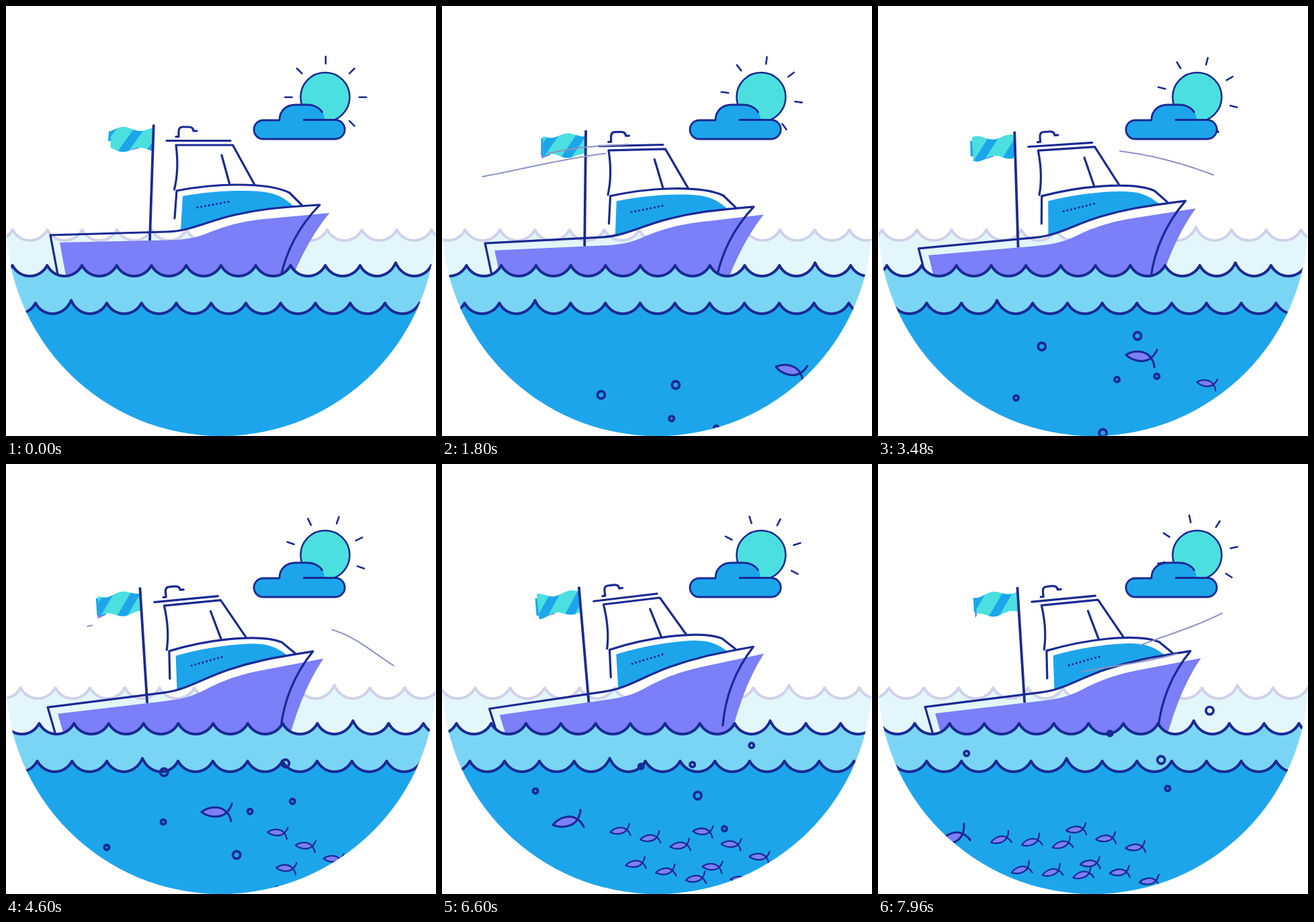
An HTML page with a canvas for the animation above (8000 ms loop, 640x640 px).

```html
<!DOCTYPE html>
<html lang="en">
<head>
<meta charset="utf-8">
<title>Boat at sea</title>
<style>
html, body { margin: 0; width: 100%; height: 100%; overflow: hidden; background: #fff; }
canvas { display: block; width: 100vw; height: 100vh; }
</style>
</head>
<body>
<canvas id="stage" width="640" height="640"></canvas>
<script>
const ctx = document.getElementById('stage').getContext('2d');
const NAVY = '#1a2a93', BLUE = '#1da5ec', PALE = '#e3f6fc', SKY = '#7ad5f4';
const TEAL = '#4be0df', PURPLE = '#7b7ff8', LILAC = '#d0d1ea', WIND = '#8c92c2';
const LOOP = 8000, STEP = 112, TAU = Math.PI * 2, RAD = Math.PI / 180;

// Value at x along rows [x, a, b, ...]: a smooth curve, or straight pieces.
function along(rows, x, smooth = true) {
  const last = rows.length - 1;
  let i = 0;
  while (i < last - 1 && x > rows[i + 1][0]) i++;
  const p = rows[i], q = rows[i + 1], h = q[0] - p[0];
  const u = Math.min(Math.max((x - p[0]) / h, 0), 1), w = u * u * (3 - 2 * u);
  const slope = (j, c) => {
    const a = rows[Math.max(j - 1, 0)], b = rows[Math.min(j + 1, last)];
    return (b[c] - a[c]) / (b[0] - a[0]);
  };
  return p.slice(1).map((v, k) => {
    const c = k + 1, gap = q[c] - v;
    if (!smooth) return v + gap * u;
    return v + gap * w + h * u * (1 - u) * (slope(i, c) * (1 - u) - slope(i + 1, c) * u);
  });
}

function fill(path, color) {
  ctx.fillStyle = color;
  ctx.fill(path);
}

function line(path, width, color = NAVY) {
  ctx.strokeStyle = color;
  ctx.lineWidth = width;
  ctx.stroke(path);
}

function poly(points) {
  const p = new Path2D();
  points.forEach(([x, y]) => p.lineTo(x, y));
  p.closePath();
  return p;
}

const globe = new Path2D();
globe.arc(320, 320, 320, 0, TAU);

function inGlobe(draw) {
  ctx.save();
  ctx.clip(globe);
  draw();
  ctx.restore();
}

// Row of scallops; the crest at the seam stands a little taller.
function wave(seam, top, color, edge) {
  const p = new Path2D();
  let px = 0, py = 0;
  for (let k = -14; k <= 14; k++) {
    const x = seam + Math.sign(k) * (k ? 53 + 51.75 * (Math.abs(k) - 1) : 0);
    const y = k ? top : top - 4;
    const low = (8 * (top + 16) - py - y) / 6;
    if (k === -14) p.moveTo(x, y);
    else p.bezierCurveTo(px + 11, low, x - 11, low, x, y);
    px = x;
    py = y;
  }
  const body = new Path2D(p);
  body.lineTo(px, 660);
  body.lineTo(-900, 660);
  fill(body, color);
  line(p, 4, edge);
}

const CLOUD = new Path2D('M443 169.5H490A14.2 14.2 0 0 1 490 198H383A14 14 0 0 1 383 170H407C407 155 418 147 431 147H448C459 147 467 152 470.5 158');
const CLOUD_FILL = new Path2D('M490 169.5A14.2 14.2 0 0 1 490 198H383A14 14 0 0 1 383 170H407C407 155 418 147 431 147H448C463 147 474 157 474.5 169.5Z');

function sky(t) {
  const rays = new Path2D();
  for (let i = 0; i < 8; i++) {
    const a = (t * 4.15 + i * 45) * RAD, c = Math.cos(a), s = Math.sin(a);
    rays.moveTo(475.8 + 50 * c, 135.8 + 50 * s);
    rays.lineTo(475.8 + 60.5 * c, 135.8 + 60.5 * s);
  }
  line(rays, 2.6);
  const sun = new Path2D();
  sun.arc(475, 135.5, 36.5, 0, TAU);
  fill(sun, TEAL);
  line(sun, 2.6);
  fill(CLOUD_FILL, BLUE);
  line(CLOUD, 2.8);
}

const HULL = new Path2D('M80 352L240 348.5C265 348 280 346 300 338C320 330 345 321 385 317L481.5 308Q439 359 409 450L98 450Z');
const HULL_LINE = new Path2D('M78 405L66 341L240 336C275 335 300 320 340 311C375 303 400 300 467 296Q421 343 408 407');
const GLASS = new Path2D('M263 283C300 276 340 274 370 275.5C395 277 410 281 428 298C390 301 365 304 340 311C305 319 285 330 260 333.5Z');
const CABIN = new Path2D('M251 316L254 275C285 269 320 266 345 266C385 266 410 272 422 278L440 296M250.5 273C255 255 256 230 253 207H337.5L370 266M321 222L333 266M239 200.5H334M253 194.5H257V187C257 182 259 180 263 180H271C276 180 279 182 279 186H284');
const DOTS = new Path2D('M285 299.8L331.5 291.3');
const MAST = new Path2D('M219.8 176.5L214 349');

function flag(t) {
  const phase = t / 2.8 % 1, right = 218, width = 62;
  const crest = (43 + 50 * phase) % 50;
  const ripple = u => (2.5 + u / 50) * Math.cos((u - crest) / 50 * TAU);

  // Underside showing where the lower edge lifts.
  for (const c of [crest, crest + 50]) {
    const a = right - Math.max(c - 23, 18), b = right - Math.min(c, 65);
    if (b < a) fill(poly([[a, 205], [b, 203], [b, 217], [a, 212]]), PURPLE);
  }
  const low = 202 + 12 * Math.sin(Math.PI * phase);
  fill(poly([[right - 54, 188], [right - 65, 186], [right - 66, low - 1], [right - 54, low]]), BLUE);

  const upper = [], lower = [];
  for (let u = 0; u <= width; u += 2) {
    upper.push([right - u, 183.2 - ripple(u)]);
    lower.unshift([right - u - 0.5, 213.8 + ripple(u)]);
  }
  const cloth = poly([...upper, ...lower]);
  fill(cloth, TEAL);
  ctx.save();
  ctx.clip(cloth);
  for (let k = -2; k < 2; k++) {
    const x = right - 17 - 42 * (phase + k);
    fill(poly([[x - 8, 179], [x + 8, 179], [x - 20, 218], [x - 36, 218]]), BLUE);
  }
  ctx.restore();
}

// Key poses: seconds, centre x, centre y, tilt in degrees.
const SWAY = [[0, 266.5, 318.5, 0], [1.79, 264, 326, -1.3], [3.47, 259, 325.5, -3.7],
  [4.59, 259.5, 320.5, -5.5], [5.71, 265.5, 317, -6.75], [7.39, 267.5, 319.7, -6.5], [7.95, 267.5, 320, -5.5]];

function boat(t) {
  const [x, y, tilt] = along(SWAY, t);
  ctx.save();
  ctx.translate(x, y);
  ctx.rotate(tilt * RAD);
  ctx.translate(-266.5, -318.5);
  fill(HULL, PURPLE);
  fill(GLASS, BLUE);
  line(HULL_LINE, 3.2);
  line(CABIN, 3.2);
  ctx.setLineDash([0, 5.85]);
  line(DOTS, 3.2);
  ctx.setLineDash([]);
  flag(t);
  ctx.lineCap = 'butt';
  line(MAST, 3.8);
  ctx.restore();
}

// Each gust: a curve, and the part of it in sight as [seconds, from x, to x].
const ARC = [[60, 254], [243, 219.5], [360, 216], [499, 251.5], [577, 300]];
const GUSTS = [
  [ARC, [[1.1, 60, 60], [1.79, 60, 243], [3.47, 360, 499], [4.59, 485, 577], [5.4, 577, 577]]],
  [ARC, [[4.2, 180, 200], [4.8, 90, 90]]],
  [[[158, 219], [215, 210], [340, 203]], [[1.35, 158, 158], [1.79, 158, 276], [2.6, 340, 340]]],
  [[[305, 309], [445, 282.5], [503, 255], [551, 218]], [[7.1, 551, 551], [7.39, 448, 551], [7.95, 305, 445]]],
  [[[390, 270], [512, 222], [558, 184], [584, 152]], [[7.2, 584, 584], [7.39, 524, 584], [7.95, 390, 512]]]
];

function wind(t) {
  for (const [curve, span] of GUSTS) {
    if (t < span[0][0] || t > span[span.length - 1][0] + 0.01) continue;
    const [from, to] = along(span, t, false);
    if (to - from < 1) continue;
    const p = new Path2D();
    for (let i = 0; i <= 30; i++) {
      const x = from + (to - from) * i / 30;
      p.lineTo(x, along(curve, x)[0]);
    }
    line(p, 2, WIND);
  }
}

const FISH_BODY = new Path2D('M0 0C12 -8 30 -8 38 3.5C28 12 10 9 0 0Z');
const FISH_LINE = new Path2D('M0 0C12 -8 30 -8 38 4Q42 9 43 17M0 0C10 9 28 12 38 3Q44 -3 46 -9');

function fish(x, y, deg, size, width) {
  ctx.save();
  ctx.translate(x, y);
  ctx.rotate(deg * RAD);
  ctx.scale(size, size);
  fill(FISH_BODY, PURPLE);
  line(FISH_LINE, width / size);
  ctx.restore();
}

// All fish follow one arc, at different delays.
function swim(t) {
  const s = t - 1.79;
  return {
    x: 497 - 80 * s + 2.3 * s * s,
    y: 537 - 16.25 * s + 3.38 * s * s,
    heading: Math.atan((6.76 * s - 16.25) / (4.6 * s - 80)) / RAD
  };
}

function leader(t) {
  const { x, y, heading } = swim(t);
  fish(x, y, heading - 2, 1, 3.1);
}

function school(t) {
  const { x, y, heading } = swim(t);
  const a = (heading + 20) * RAD, b = a + 51 * RAD;
  for (let row = 0; row < 2; row++)
    for (let i = 0; i < 3; i++)
      fish(x + 46 * i * Math.cos(a) + 54.5 * row * Math.cos(b),
        y + 27 + 46 * i * Math.sin(a) + 54.5 * row * Math.sin(b), heading - 7, 0.66, 2.3);
}

// radius, birth, life, start x, drift and its curve, rise and its slowing
const BUBBLES = [
  [5.5, 0.18, 6.4, 208, 24.7, -4.2, 42.9, 0],
  [5.5, 0, 6.4, 315, 16, 1.3, 48.7, 1],
  [3.6, 0.81, 6.65, 332, 10.5, -0.6, 34.6, 0],
  [3.6, 2.13, 6.6, 177, 19, 1.7, 50, 1.3],
  [3.6, 1.38, 6.9, 408.5, -1.5, 2.2, 48, 0.8],
  [5.5, 3.22, 6.6, 334, 1.9, 3.5, 50, 1.3],
  [3.6, 2.73, 6.6, 160, -5.4, 0, 41.6, 0],
  [3.6, 4.25, 6.6, 401.5, 8, 0, 44.6, 0]
];

function bubbles(t) {
  for (const [r, birth, life, x, drift, bend, rise, slow] of BUBBLES) {
    const s = t - birth;
    if (s < 0 || s > life) continue;
    const grow = Math.max(0, 1 - (life - s) / 0.45);
    const ring = new Path2D();
    ring.arc(x + drift * s + bend * s * s, 648 - rise * s + slow * s * s, r + (11 - r) * grow, 0, TAU);
    line(ring, 3.9 - 2.4 * grow * grow);
  }
}

function draw(t) {
  ctx.clearRect(0, 0, 640, 640);
  ctx.lineCap = ctx.lineJoin = 'round';
  sky(t);
  inGlobe(() => wave(425 + 13.84 * t, 333, PALE, LILAC));
  boat(t);
  inGlobe(() => {
    wave(580 - 13.84 * t, 386, SKY, NAVY);
    wave(97 + 23.1 * t, 442, BLUE, NAVY);
    school(t - 1.4);
    school(t - 3.2);
    leader(t);
    bubbles(t);
  });
  wind(t);
}

const start = performance.now();
function tick() {
  const ms = (performance.now() - start) % LOOP;
  draw(Math.floor((ms + 30) / STEP) * STEP / 1000);
  requestAnimationFrame(tick);
}
tick();
</script>
</body>
</html>
```
